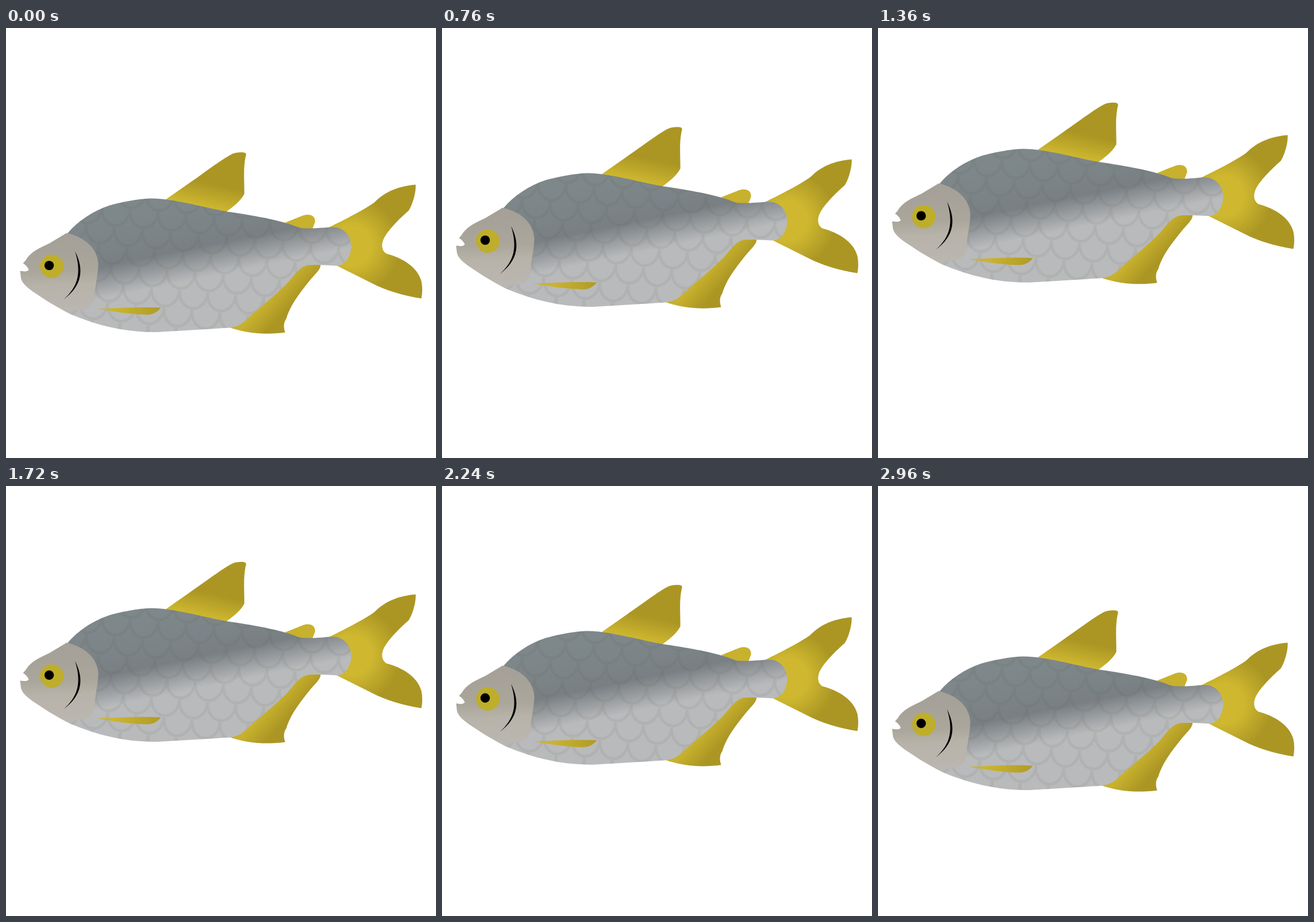
An HTML page that plays this animation: 748x748 px, repeating every 3 s.

```html
<!DOCTYPE html>
<html>
<head>
<meta charset="utf-8">
<style>
  html, body { margin: 0; width: 100%; height: 100%; overflow: hidden; background: #fff; }
  svg { display: block; width: 100%; height: 100%; }
</style>
</head>
<body>
<svg viewBox="0 0 748 748">
  <defs>
    <linearGradient id="skin" gradientUnits="userSpaceOnUse" x1="178" y1="330" x2="205" y2="462">
      <stop offset="0" stop-color="#7e878a"/>
      <stop offset=".4" stop-color="#7b8387"/>
      <stop offset=".6" stop-color="#797f83"/>
      <stop offset="1" stop-color="#b9babc"/>
    </linearGradient>
    <linearGradient id="face" gradientUnits="userSpaceOnUse" x1="90" y1="365" x2="95" y2="490">
      <stop offset="0" stop-color="#a5a098"/>
      <stop offset=".45" stop-color="#aaa69b"/>
      <stop offset=".65" stop-color="#b8b3a9"/>
      <stop offset="1" stop-color="#bab6b0"/>
    </linearGradient>
    <radialGradient id="tail" gradientUnits="userSpaceOnUse" cx="600" cy="378" r="100">
      <stop offset=".35" stop-color="#cfb82f"/>
      <stop offset=".85" stop-color="#ab9624"/>
    </radialGradient>
    <linearGradient id="back" gradientUnits="userSpaceOnUse" x1="335" y1="310" x2="344" y2="268">
      <stop offset="0" stop-color="#cfb82f"/>
      <stop offset="1" stop-color="#ab9624"/>
    </linearGradient>
    <linearGradient id="belly" gradientUnits="userSpaceOnUse" x1="453" y1="473" x2="480" y2="498">
      <stop offset="0" stop-color="#c8b12d"/>
      <stop offset="1" stop-color="#ab9624"/>
    </linearGradient>
    <linearGradient id="side">
      <stop offset=".3" stop-color="#cbb42e"/>
      <stop offset="1" stop-color="#b09b26"/>
    </linearGradient>
    <pattern id="scales" width="49" height="66" patternUnits="userSpaceOnUse" patternTransform="translate(188 346) rotate(5)">
      <g fill="none" stroke="#465038" stroke-opacity=".08" stroke-width="5">
        <path d="M0 0C0 17 11 30 24.5 30S49 17 49 0"/>
        <path d="M-24.5 33C-24.5 50 -13.5 63 0 63S24.5 50 24.5 33C24.5 50 35.5 63 49 63S73.5 50 73.5 33"/>
      </g>
    </pattern>
    <path id="body" d="M107 356C125 335 150 318 180 308C205 301 235 296 253 296C290 296 340 311 385 319C440 327 485 336 507 346C515 349 535 348 550 347C562 346 569 345 577 347C591 351 600 364 600 380C599 398 590 410 578 413C560 412 535 411 525 412C510 414 497 434 490 442C470 462 440 487 425 500C410 514 405 519 387 521C340 524 290 527 262 528.500C210 529 160 518 111 497Z"/>
  </defs>
  <g id="fish">
    <path fill="url(#tail)" d="M560 347C590 332 622 316 640 303C660 283 682 275 712 272C713 285 707 306 700 317C685 330 665 350 657 365C652 375 652 386 661 392C690 400 715 415 722 440C724 450 724 460 722 470C690 465 660 456 635 443L575 413Z"/>
    <path fill="url(#back)" d="M277 298L320 268C350 247 375 228 392 219C400 215 412 215 416 217Q418 219 416 224C412 245 414 262 414 288C408 300 395 310 383 319L320 315Z"/>
    <path fill="#c8b12d" d="M485 338L515 326C528 321 538 326 537 337L532 350H510Z"/>
    <path fill="url(#belly)" d="M387 520C420 532 455 533 485 529C482 520 482 512 487 505C495 478 515 455 530 436C545 420 546 418 547 410H520L480 440Z"/>
    <use href="#body" fill="url(#skin)"/>
    <use href="#body" fill="url(#scales)"/>
    <path fill="url(#face)" d="M34 403C42 389 58 382 75 374L105 356C140 364 160 386 160 412C158 440 153 455 153 470C150 484 139 491 128 490C120 490 114 493 111 497C85 484 64 470 46 458C31 447 25 440 25 431L24 422C30 423 36 424 39 420C37 415 33 411 29 409Z"/>
    <path fill="url(#side)" d="M157 488C190 487 230 484 269 486C262 495 253 499 240 498C210 497 185 492 157 488Z"/>
    <circle cx="79" cy="414" r="20.500" fill="#beae2b"/>
    <circle cx="74.500" cy="412.500" r="8.200"/>
    <path d="M119.500 388C135 418 133 447 100 471.500C125 449 131 425 119.500 388Z"/>
  </g>
</svg>
<script>
  const fish = document.getElementById('fish');
  const LOOP = 3000, HALF = LOOP / 2, LIFT = 89;

  // Cubic timing curve with flat ends; a and b are the handle positions.
  function ease(x, a, b) {
    let lo = 0, hi = 1, s;
    for (let i = 0; i < 20; i++) {
      s = (lo + hi) / 2;
      const at = 3 * (1 - s) ** 2 * s * a + 3 * (1 - s) * s * s * b + s ** 3;
      if (at < x) lo = s; else hi = s;
    }
    return s * s * (3 - 2 * s);
  }

  function draw() {
    const t = performance.now() % LOOP;
    const rise = t < HALF
      ? ease(t / HALF, .33, .7)
      : 1 - ease((t - HALF) / HALF, .36, .62);
    fish.setAttribute('transform', `translate(.6 ${.6 - LIFT * rise})`);
    requestAnimationFrame(draw);
  }
  draw();
</script>
</body>
</html>
```
